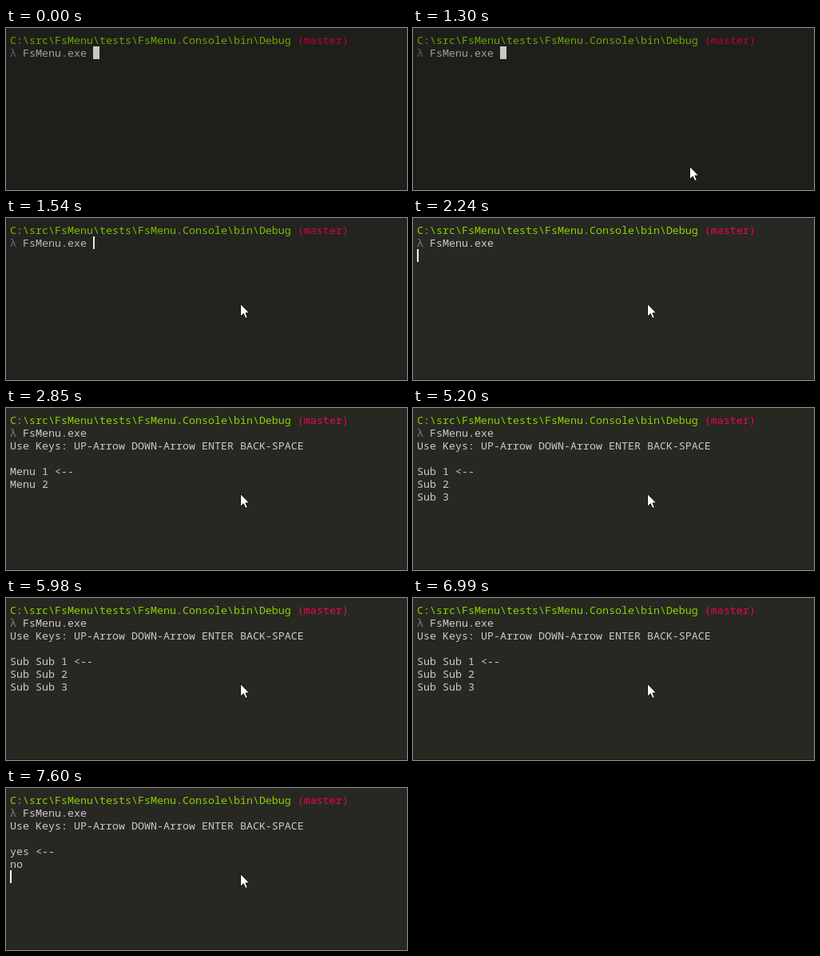
Recreate the animation shown at these times as an HTML page. Size 502x203 px, loop 8000 ms.

```html
<!DOCTYPE html>
<html lang="en">
<head>
<meta charset="utf-8">
<title>Console menu</title>
<style>
  html, body { margin: 0; width: 100%; height: 100%; overflow: hidden; background: #272822; }
  svg { display: block; width: 502px; height: 203px; }
  text {
    font: 13.3333px "Noto Sans Mono", "DejaVu Sans Mono", monospace;
    font-variant-ligatures: none;
    white-space: pre;
    fill: #cacaca;
  }
  .path { fill: #8dd006; }
  .branch { fill: #f3044b; }
  .prompt { fill: #7c7c7c; }
</style>
</head>
<body>
<svg viewBox="0 0 502 203" xmlns="http://www.w3.org/2000/svg">
  <rect width="502" height="203" fill="#272822"/>
  <rect y="202" width="502" height="1" fill="#1b1b18"/>
  <text x="5" y="20"><tspan class="path">C:\src\FsMenu\tests\FsMenu.Console\bin\Debug</tspan> <tspan class="branch">(master)</tspan></text>
  <text x="5" y="36"><tspan class="prompt">λ</tspan> FsMenu.exe</text>
  <g id="output"></g>
  <rect id="caret" height="16" fill="#fff"/>
  <rect id="shade" width="502" height="203" fill="#000"/>
  <path id="mouse" d="M.5 .5V16.6L4.3 13L6.8 18.6L9.4 17.5L7 12H11.6Z" fill="#fff" stroke="#0c0c0c"/>
</svg>
<script>
const LOOP = 8000, CELL = 8, ROW = 16, LEFT = 5, TOP = 7;
const HELP = "Use Keys: UP-Arrow DOWN-Arrow ENTER BACK-SPACE";
const MENUS = {
  main: ["Menu 1", "Menu 2"],
  sub: ["Sub 1", "Sub 2", "Sub 3"],
  subSub: ["Sub Sub 1", "Sub Sub 2", "Sub Sub 3"],
  ask: ["yes", "no"]
};

// Each step changes only the listed properties at its time.
const STEPS = [
  [0, { shade: 0.22, mouse: null, caret: "block", col: 13, row: 1, help: false, menu: null, pick: 0 }],
  [1300, { mouse: [346, 173] }],
  [1370, { mouse: [293, 107] }],
  [1540, { shade: 0.1, caret: "bar" }],
  [1620, { shade: 0 }],
  [2070, { caret: "off" }],
  [2240, { caret: "bar", col: 0, row: 2 }],
  [2310, { help: true, row: 3 }],
  [2390, { menu: "main" }],
  [2850, { caret: "off" }],
  [3170, { pick: 1 }],
  [3400, { caret: "bar" }],
  [3550, { menu: "sub", pick: 0 }],
  [4100, { caret: "off" }],
  [4650, { caret: "bar" }],
  [4880, { pick: 1 }],
  [5200, { pick: 0, caret: "off" }],
  [5430, { menu: "subSub", caret: "bar" }],
  [5980, { caret: "off" }],
  [6510, { caret: "bar" }],
  [6990, { caret: "off" }],
  [7140, { pick: 1 }],
  [7520, { caret: "bar" }],
  [7600, { menu: "ask", pick: 0 }]
];

const $ = id => document.getElementById(id);
const set = (el, attrs) => {
  for (const key in attrs) el.setAttribute(key, attrs[key]);
};

const lines = [2, 4, 5, 6].map(row => {
  const el = document.createElementNS("http://www.w3.org/2000/svg", "text");
  set(el, { x: LEFT, y: TOP + row * ROW + 13 });
  $("output").append(el);
  return el;
});

function draw(s) {
  const items = MENUS[s.menu] || [];
  lines[0].textContent = s.help ? HELP : "";
  for (let i = 0; i < 3; i++) {
    const label = items[i] || "";
    lines[i + 1].textContent = label && i === s.pick ? label + " <--" : label;
  }
  const row = s.menu ? 4 + items.length : s.row;
  set($("caret"), {
    x: LEFT + s.col * CELL,
    y: TOP + row * ROW,
    width: s.caret === "block" ? CELL : 2,
    visibility: s.caret === "off" ? "hidden" : "visible"
  });
  set($("shade"), { opacity: s.shade });
  set($("mouse"), {
    transform: `translate(${s.mouse || [0, 0]})`,
    visibility: s.mouse ? "visible" : "hidden"
  });
}

const start = performance.now();
let shown = -1;

function tick() {
  const t = (performance.now() - start) % LOOP;
  const past = STEPS.filter(([at]) => at <= t);
  if (past.length !== shown) {
    shown = past.length;
    draw(Object.assign({}, ...past.map(([, change]) => change)));
  }
  requestAnimationFrame(tick);
}
tick();
</script>
</body>
</html>
```
